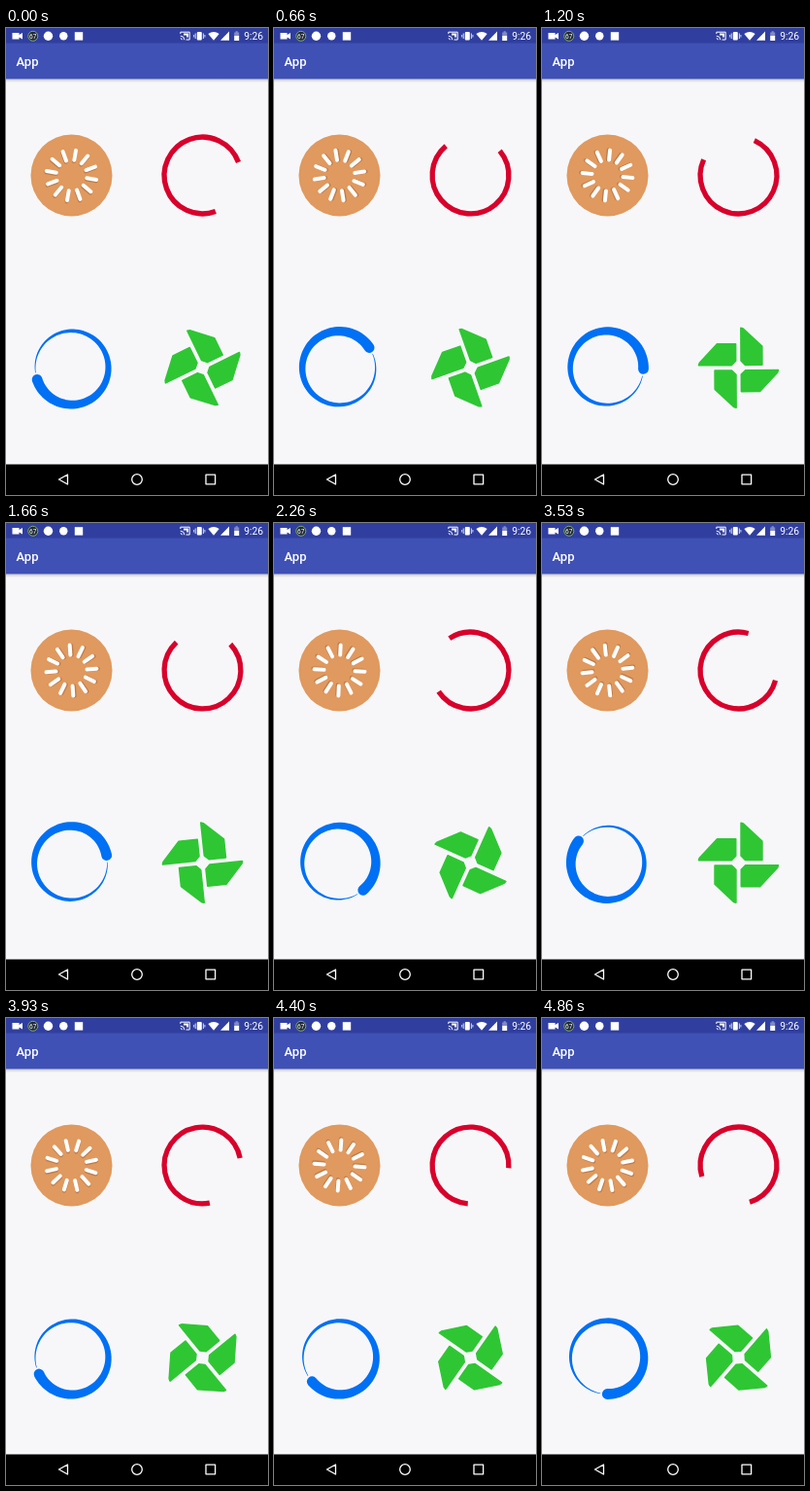
An HTML page that plays this animation: 270x480 px, repeating every 4920 ms.

```html
<!DOCTYPE html>
<html lang="en">
<head>
<meta charset="utf-8">
<title>Loading spinners</title>
<style>
  html, body { margin: 0; height: 100%; overflow: hidden; background: #f7f7f9; }
  svg { display: block; width: 100%; height: 100%; }
  text { font-family: Roboto, sans-serif; fill: #fff; }
</style>
</head>
<body>
<svg viewBox="0 0 270 480">
  <defs>
    <linearGradient id="shade" x2="0" y2="1">
      <stop stop-color="#c3c3c8"/>
      <stop offset="1" stop-color="#f7f7f9"/>
    </linearGradient>
    <path id="blade" d="M2.6-41 5-40.2 24.4-22V-2.8H7L2.6-7.2Z"/>
    <path id="spoke" d="M16 0H26"/>
  </defs>

  <rect width="270" height="480" fill="#f7f7f9"/>
  <rect y="52" width="270" height="4" fill="url(#shade)"/>
  <rect width="270" height="52.4" fill="#3f51b5"/>
  <rect width="270" height="15.5" fill="#303f9f"/>
  <rect y="448.5" width="270" height="31.5"/>
  <text x="10.5" y="39" font-size="13" font-weight="500">App</text>
  <text x="265" y="12" font-size="10.3" text-anchor="end">9:26</text>

  <!-- status icons -->
  <g fill="#fff">
    <path d="M6.5 5H13.5V7L17 5V11.5L13.5 9.5V11.5H6.5Z"/>
    <circle cx="27.8" cy="8.3" r="5" fill="#222b38" stroke="#7fae6a"/>
    <text x="27.8" y="10.7" font-size="6.6" text-anchor="middle">67</text>
    <circle cx="43.5" cy="8.3" r="4.7"/>
    <circle cx="59.3" cy="8.3" r="4.2"/>
    <rect x="70.8" y="4.2" width="8.4" height="8.4"/>
    <rect x="196.8" y="4" width="5" height="8.6" rx="1"/>
    <path d="M208.3 6Q214 1.8 219.7 6L214 12.8Z"/>
    <path d="M221 12.8 230 3.6V12.8Z"/>
    <path d="M235.2 4.4H236.6V3.3H238.8V4.4H240.2V8H235.2Z" opacity=".4"/>
    <path d="M235.2 8H240.2V13H235.2Z"/>
  </g>
  <g fill="none" stroke="#fff">
    <path d="M179.8 6V4.2H189.2V12H185.5M179.8 8.2A4 4 0 0 1 183.8 12.2M179.8 10.6A2 2 0 0 1 181.5 12.2"/>
    <path d="M183 6.5H187V9.5" stroke-width="1.8"/>
    <path d="M195.2 5.5V11M203.4 5.5V11M193.7 7V9.5M204.9 7V9.5" stroke-width=".8"/>
    <g stroke-width="1.3" stroke-linejoin="round">
      <path d="M63.5 459V469L54.5 464Z"/>
      <circle cx="135" cy="464" r="5.3"/>
      <rect x="206" y="459.2" width="9.6" height="9.6"/>
    </g>
  </g>

  <!-- spinners -->
  <circle cx="67.5" cy="151.5" r="42" fill="#e0995e"/>
  <g transform="translate(67.5 151.5)">
    <g id="spokes" stroke-width="4" stroke-linecap="round"></g>
  </g>
  <g transform="translate(202.5 151.5)">
    <path id="arc" fill="none" stroke="#d8022b" stroke-width="5.3"/>
  </g>
  <g transform="translate(67.3 349.3)"><path id="comet" fill="#0070f4"/></g>
  <g transform="translate(202.5 349.2)">
    <g id="pinwheel" fill="#2fc634" stroke="#2fc634" stroke-width="1.6" stroke-linejoin="round"></g>
  </g>
</svg>
<script>
const FRAMES = 74, LOOP = 4920;

// Angles in degrees, reached at the frames in keyFrames; motion is linear between them.
const keyFrames = [0, 10, 25, 42, 53, 66, 73];
const angles = {
  spokes: [10, 261, 626, 1035, 1284, 1594, 1759],
  arc: [25, -445, -1168, -2000, -2550, -3191, -3482],
  comet: [161, 686, 1428, 2223, 2737, 3379, 3690],
  pinwheel: [-26, 250.5, 624, 1021, 1260, 1565, 1751]
};

const byId = id => document.getElementById(id);

const polar = (r, deg) => {
  const a = deg * Math.PI / 180;
  return (r * Math.cos(a)).toFixed(2) + ' ' + (r * Math.sin(a)).toFixed(2);
};

const copies = (id, n) => Array.from({ length: n }, (_, i) =>
  `<use href="#${id}" transform="rotate(${i * 360 / n})"/>`).join('');

// A ring that swells from a thin tail to a round head at angle 0.
function cometPath() {
  const outer = [], inner = [], sweep = 349, steps = 90;
  for (let i = 0; i <= steps; i++) {
    const s = i / steps, angle = (s - 1) * sweep;
    const half = 0.3 + 5.1 * s;
    const radius = 37.2 + Math.sin(Math.PI * s);
    outer.push(polar(radius + half, angle));
    inner.unshift(polar(radius - half, angle));
  }
  return `M${outer.join('L')}A5.4 5.4 0 0 1 ${inner.join('L')}Z`;
}

// The shadow is part of the spinning group, so it turns with the spokes.
byId('spokes').innerHTML =
  `<g stroke="#bd7d4c" transform="translate(-.2 1.4)">${copies('spoke', 12)}</g>` +
  `<g stroke="#fff">${copies('spoke', 12)}</g>`;
byId('pinwheel').innerHTML = copies('blade', 4);
byId('arc').setAttribute('d', `M${polar(39.4, 45)}A39.4 39.4 0 1 1 ${polar(39.4, -45)}`);
byId('comet').setAttribute('d', cometPath());

function angleAt(keys, frame) {
  let i = 0;
  while (i < keys.length - 2 && frame >= keyFrames[i + 1]) i++;
  const u = (frame - keyFrames[i]) / (keyFrames[i + 1] - keyFrames[i]);
  return keys[i] + (keys[i + 1] - keys[i]) * u;
}

// Fifteen frames a second, with steps of 60, 70 and 70 ms.
function frameAt(ms) {
  const rest = ms % 200;
  const frame = Math.floor(ms / 200) * 3 + (rest >= 130 ? 2 : rest >= 60 ? 1 : 0);
  return Math.min(frame, FRAMES - 1);
}

function draw() {
  const frame = frameAt(performance.now() % LOOP);
  for (const [id, keys] of Object.entries(angles)) {
    byId(id).setAttribute('transform', `rotate(${angleAt(keys, frame)})`);
  }
  requestAnimationFrame(draw);
}
draw();
</script>
</body>
</html>
```
